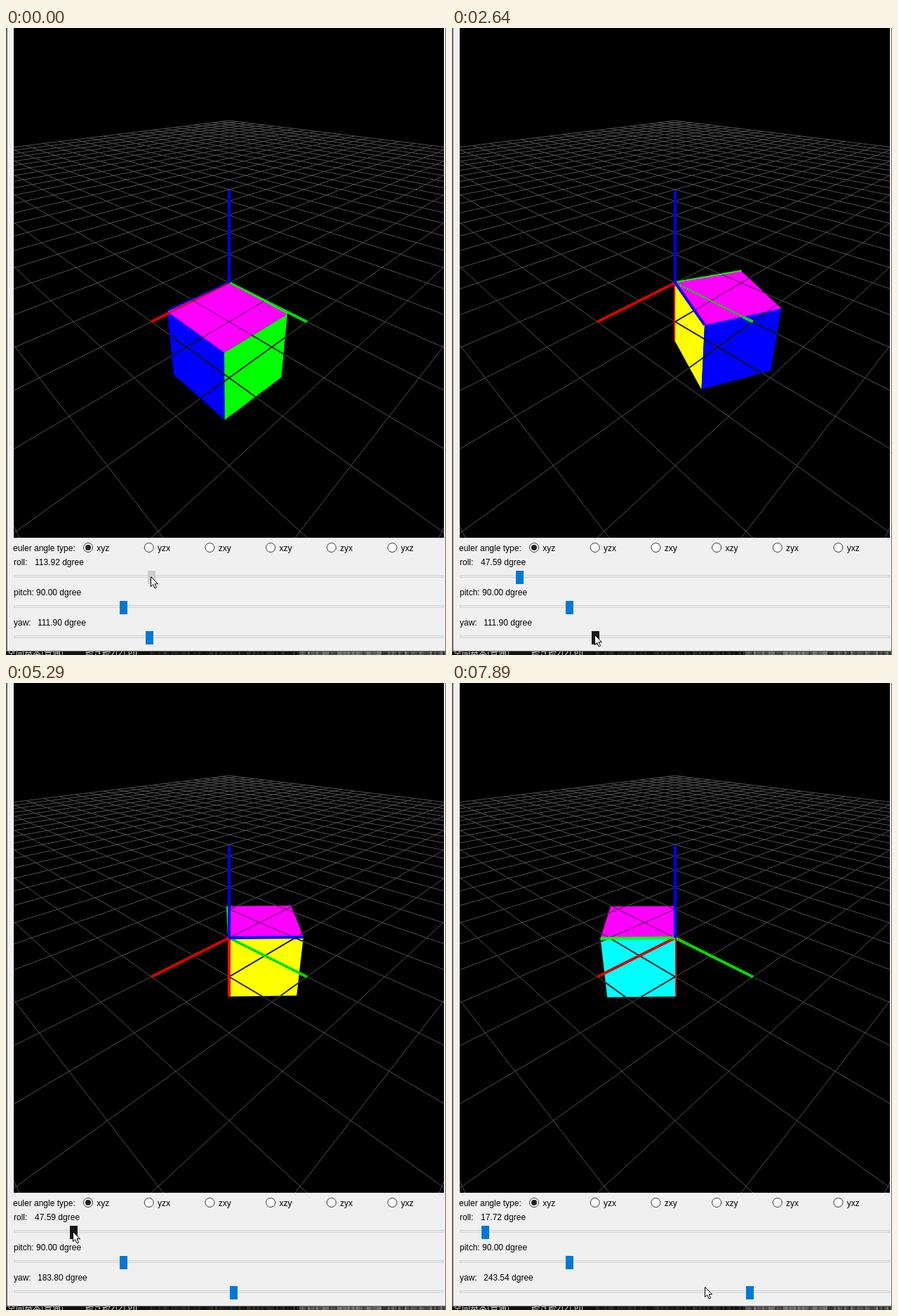
An HTML page with a canvas for the animation above (8 s loop, 627x893 px).

```html
<!DOCTYPE html>
<html>
<head>
<meta charset="utf-8">
<style>
html, body { margin: 0; width: 100%; height: 100%; overflow: hidden; background: #f0f0f0; }
canvas { display: block; }
</style>
</head>
<body>
<canvas id="stage" width="627" height="893"></canvas>
<script>
const ctx = document.getElementById('stage').getContext('2d');
const LOOP = 8000, TICK = 138, UNIT = 360 / 711, RAD = Math.PI / 180;
const CX = 318, CY = 363, FOCAL = 531, DIST = 8, COS = Math.cos(30 * RAD), SIN = 0.5;
const SIDE = 1.6;
const sliderTop = { roll: 773, pitch: 816, yaw: 859 };

// The pointer reaches a thumb at `arrive`, then drags it from start to end
const drags = [
  { name: 'roll', arrive: 0, start: 0, end: 560, from: 225, to: 177 },
  { name: 'roll', arrive: 560, start: 800, end: 1708, from: 177, to: 94 },
  { name: 'yaw', arrive: 2380, start: 2700, end: 3250, from: 221, to: 235 },
  { name: 'yaw', arrive: 3250, start: 3400, end: 4550, from: 235, to: 363 },
  { name: 'roll', arrive: 4850, start: 5500, end: 6230, from: 94, to: 35 },
  { name: 'yaw', arrive: 6750, start: 7100, end: 7640, from: 363, to: 481 }
];
const REST = [360, 860], REST_TIME = 7860;

const clamp = u => Math.max(0, Math.min(1, u));
const mix = (a, b, u) => a + (b - a) * u;
const easeOut = u => 1 - (1 - u) ** 2;
const progress = (t, a, b) => clamp((t - a) / (b - a || 1));
const thumbX = degrees => Math.round(11.9 + degrees * 602 / 360);

function angle(name, t) {
  const own = drags.filter(d => d.name === name);
  const d = own.filter(d => d.start <= t).pop() || own[0];
  return Math.round(mix(d.from, d.to, progress(t, d.start, d.end))) * UNIT;
}

const grip = (name, value) => [thumbX(value * UNIT) + 4, sliderTop[name] + (name === 'roll' ? 8 : 5)];

function pointerState(t) {
  const i = drags.filter(d => d.start <= t).length - 1;
  const d = drags[i], next = drags[i + 1];
  const held = t <= d.end || (next && next.name === d.name);
  const value = mix(d.from, d.to, progress(t, d.start, d.end));
  const here = grip(d.name, value);
  if (held) return { at: here, held: d.name };
  const goal = next ? grip(next.name, next.from) : REST;
  const u = easeOut(progress(t, d.end, next ? next.arrive : REST_TIME));
  return { at: here.map((v, k) => Math.round(mix(v, goal[k], u))), held: '' };
}

function project([x, y, z]) {
  const right = (y - x) / Math.SQRT2, near = (x + y) / Math.SQRT2;
  const k = FOCAL / (DIST - near * COS - z * SIN);
  return [CX + right * k, CY - (z * COS - near * SIN) * k];
}

function trace(points) {
  points.forEach((p, i) => ctx[i ? 'lineTo' : 'moveTo'](...project(p)));
}

function stroke(color, width) {
  ctx.strokeStyle = color;
  ctx.lineWidth = width;
  ctx.stroke();
}

function line(points, color, width) {
  ctx.beginPath();
  trace(points);
  stroke(color, width);
}

function fillFace(face) {
  ctx.beginPath();
  trace(face.points);
  ctx.fillStyle = face.color;
  ctx.fill();
}

function within(faces, draw) {
  ctx.save();
  ctx.beginPath();
  for (const f of faces) { trace(f.points); ctx.closePath(); }
  ctx.clip();
  draw();
  ctx.restore();
}

function grid(color, width) {
  ctx.beginPath();
  for (let k = -20; k <= 20; k++) {
    const end = Math.min(20, 12 - k); // stop short of the camera
    trace([[k, -20, 0], [k, end, 0]]);
    trace([[-20, k, 0], [end, k, 0]]);
  }
  stroke(color, width);
}

function floorAxes(width) {
  const O = [0, 0, 0];
  for (const [end, color, mark] of [[[2, 0, 0], '#e80000', '#a01010'], [[0, 2, 0], '#00f000', '#109010']]) {
    line([O, end], color, width);
    ctx.setLineDash([3, 2]);
    line([O, end], mark, 1);
    ctx.setLineDash([]);
  }
}

function scene(heading) {
  const dir = a => [SIDE * Math.cos(a * RAD), SIDE * Math.sin(a * RAD)];
  const b = dir(heading), g = dir(heading + 90);
  const at = (i, j, k) => [b[0] * i + g[0] * j, b[1] * i + g[1] * j, -SIDE * k];
  const wall = (color, normal, offset, p, q) => ({
    color,
    seen: DIST * COS * Math.cos((normal - 45) * RAD) > offset,
    points: [at(...p, 0), at(...q, 0), at(...q, 1), at(...p, 1)]
  });
  const cyan = wall('#0ff', heading + 180, 0, [0, 0], [0, 1]);
  const yellow = wall('#ff0', heading - 90, 0, [0, 0], [1, 0]);
  const walls = [cyan, yellow,
    wall('#00f', heading, SIDE, [1, 0], [1, 1]),
    wall('#0f0', heading + 90, SIDE, [0, 1], [1, 1])].filter(w => w.seen);
  const top = { color: '#f0f', points: [at(0, 0, 0), at(1, 0, 0), at(1, 1, 0), at(0, 1, 0)] };
  const edges = [
    [at(0, 0, 1), '#f00', cyan.seen && yellow.seen],
    [at(0, 1, 0), '#0f0', cyan.seen],
    [at(1, 0, 0), '#00f', yellow.seen]];
  const cubeAxes = front => edges.filter(e => e[2] === front)
    .forEach(([end, color]) => line([at(0, 0, 0), end], color, 4));

  ctx.save();
  ctx.beginPath();
  ctx.rect(11, 0, 613, 726);
  ctx.clip();
  ctx.fillStyle = '#000';
  ctx.fillRect(11, 0, 613, 726);
  grid('#505050', 1);
  floorAxes(4);
  cubeAxes(false);
  walls.forEach(fillFace);
  within(walls, () => { grid('#161616', 1.8); floorAxes(4); });
  fillFace(top);
  within([top], () => { grid('#380838', 1); floorAxes(2); });
  cubeAxes(true);
  line([[0, 0, 0], [0, 0, 2]], '#00f', 4);
  ctx.restore();
}

function text(s, x, y) {
  ctx.fillStyle = '#000';
  ctx.font = '12px "Liberation Sans", Arial, sans-serif';
  ctx.fillText(s, x, y);
}

function disc(x, y, r, fill) {
  ctx.beginPath();
  ctx.arc(x, y, r, 0, 7);
  ctx.fillStyle = fill;
  ctx.fill();
}

function radios() {
  text('euler angle type:', 10, 745);
  ['xyz', 'yzx', 'zxy', 'xzy', 'zyx', 'yxz'].forEach((name, i) => {
    const x = 117 + 86.7 * i;
    disc(x, 740, 6.5, '#fff');
    stroke('#333', 1);
    if (!i) disc(x, 740, 4, '#222');
    text(name, x + 12.3, 745);
  });
}

function slider(name, valueX, degrees, pointer) {
  const x = thumbX(degrees), y = sliderTop[name], [px, py] = pointer.at;
  text(name + ':', 11, y - 8);
  text(degrees.toFixed(2) + ' dgree', valueX, y - 8);
  ctx.fillStyle = '#d6d6d6';
  ctx.fillRect(11, y + 6, 613, 4);
  ctx.fillStyle = '#e7eaea';
  ctx.fillRect(12, y + 7, 611, 2);
  const hover = px >= x && px < x + 11 && py >= y && py < y + 19;
  ctx.fillStyle = pointer.held === name ? '#ccc' : hover ? '#171717' : '#0078d7';
  ctx.fillRect(x, y, 11, 19);
}

function arrow([x, y]) {
  ctx.save();
  ctx.translate(x + 0.5, y + 0.5);
  const shape = new Path2D('M0 0V14L3.2 11L5.7 16.5L8 15.5L5.6 10.2H10Z');
  ctx.fillStyle = '#fff';
  ctx.fill(shape);
  ctx.strokeStyle = '#000';
  ctx.lineWidth = 1;
  ctx.stroke(shape);
  ctx.restore();
}

// Sliver of the desktop below the window
function desktop() {
  ctx.fillStyle = '#101010';
  ctx.fillRect(0, 0, 627, 893);
  let seed = 7;
  for (let x = 205; x < 627; x += 3) {
    seed = seed * 16807 % 2147483647;
    const v = x > 415 ? 50 + seed % 70 : 16 + seed % 30;
    ctx.fillStyle = `rgb(${v},${v},${v})`;
    ctx.fillRect(x, 888, 3, 5);
  }
  ctx.fillStyle = '#ddd';
  ctx.font = '12px "Noto Sans CJK JP", "Noto Sans CJK", sans-serif';
  ctx.fillText('空間基本(普通)', 2, 894);
  ctx.fillText('続き続2(2).gif', 113, 894);
}

function windowFrame() {
  ctx.fillStyle = '#666';
  ctx.fillRect(0, 0, 627, 888);
  ctx.fillStyle = '#f0f0f0';
  ctx.fillRect(2, 0, 624, 887);
}

function draw(now) {
  const t = Math.floor(now % LOOP / TICK + 0.001) * TICK;
  const roll = angle('roll', t), yaw = angle('yaw', t), pointer = pointerState(t);
  desktop();
  windowFrame();
  scene(yaw - roll);
  radios();
  slider('roll', 41, roll, pointer);
  slider('pitch', 43, 90, pointer);
  slider('yaw', 45, yaw, pointer);
  arrow(pointer.at);
}

const start = performance.now();
function tick() {
  draw(performance.now() - start);
  requestAnimationFrame(tick);
}
tick();
</script>
</body>
</html>
```
